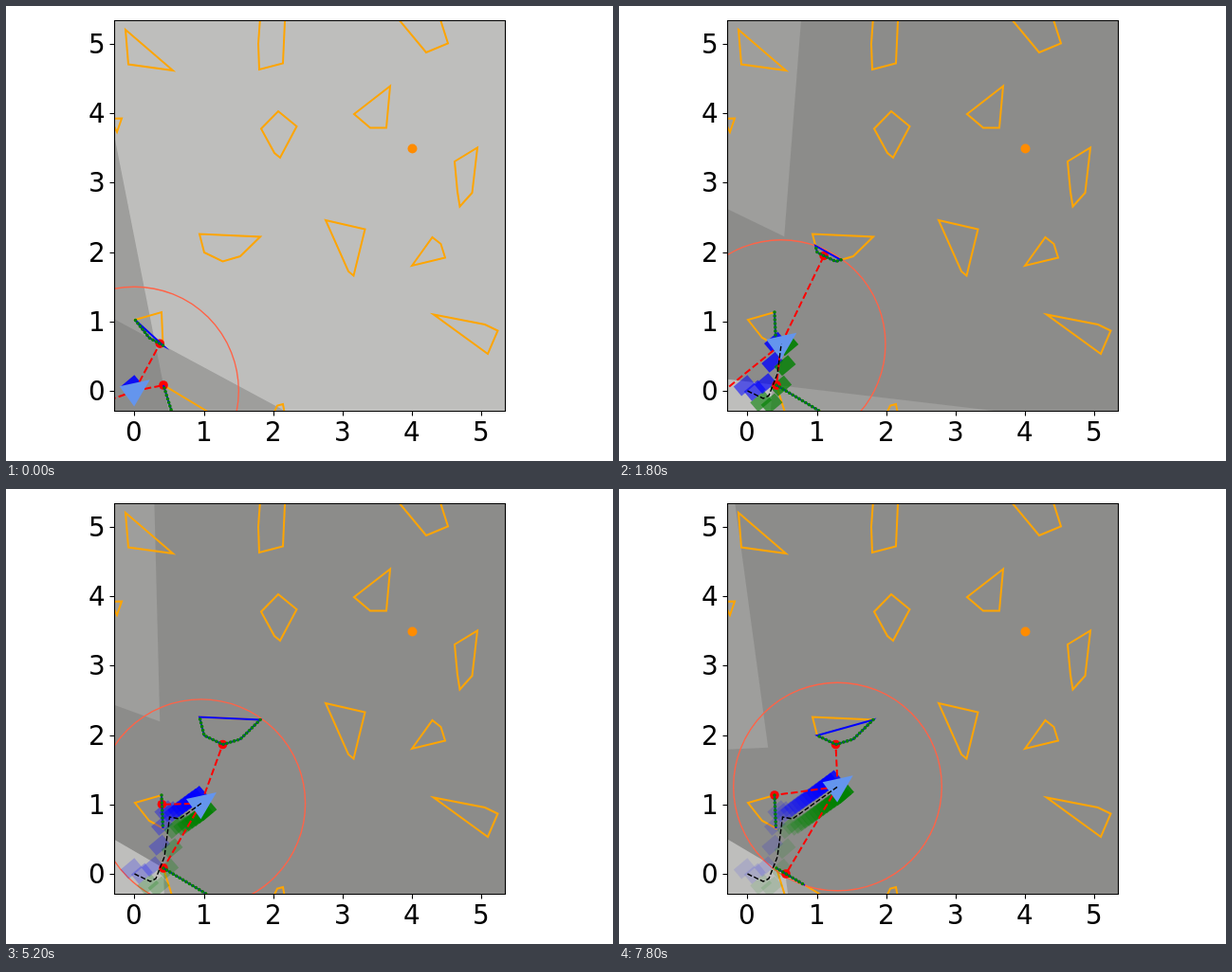
Recreate the animation shown at these times as an HTML page with a canvas. Size 640x480 px, loop 8000 ms.

```html
<!DOCTYPE html>
<html lang="en">
<head>
<meta charset="utf-8">
<title>Walking robot among obstacles</title>
<style>
html, body { margin: 0; width: 100%; height: 100%; overflow: hidden; background: #fff; }
canvas { display: block; }
</style>
</head>
<body>
<canvas id="stage" width="640" height="480"></canvas>
<script>
const ctx = document.getElementById('stage').getContext('2d');
const STEP = 200, STEPS = 40, UNIT = 73.2, RANGE = 1.5 * UNIT;
const ORIGIN = { x: 135.3, y: 406 };
const BOX = { x: 114.5, y: 15.5, size: 412 };
const SHADES = ['#bebebc', '#9e9e9c', '#8c8c8a'];

// Obstacles the robot can sense; the closing edge never faces it.
const upper = [[268,243.5], [247,264], [228.5,269.5], [209,260], [204,240.5]];
const near = [[164,323], [165.5,358], [151,350], [136,331]];
const low = [[180,445], [166,400], [211,427]];
const left = [[70,410], [90,423], [80,440]];

const obstacles = [
  upper, near, low, left,
  [[126,25], [176,68], [129,61.5]],
  [[268.5,5], [266,40], [267,67], [292,60.5], [294.5,5]],
  [[409,8], [443,49], [466,39.5], [456,8]],
  [[287,111], [306.5,127], [289,160], [283,155], [269,129.5]],
  [[405,84.5], [367,114], [384,128.5], [401,128.5]],
  [[473,164], [497,149.5], [491.5,197], [478.5,211.5], [476,196]],
  [[337,226], [378.5,235.5], [366.5,284.5], [361,280]],
  [[428,274], [449.5,244], [458.5,251], [463,265.5]],
  [[451,325.5], [505,336], [518.5,342.5], [508,367]],
  [[283,428], [286,421.5], [292,420], [293.5,428]],
  [[110,119], [122,118.5], [117,133]]
];

// Turning points of the walk: step, x, y.
const route = [
  [0, 135.5, 406], [3, 152, 414], [4, 158, 411], [6, 167, 388],
  [10, 172.5, 346], [14, 183, 348], [39, 230.5, 314]
];

const mix = (a, b, k) => a.map((v, i) => v + (b[i] - v) * k);
const distance = (a, b) => Math.hypot(a[0] - b[0], a[1] - b[1]);
const cross = (a, b, p) => (b[0] - a[0]) * (p[1] - a[1]) - (b[1] - a[1]) * (p[0] - a[0]);

function robotAt(step) {
  const i = Math.max(1, route.findIndex(key => key[0] >= step));
  const a = route[i - 1], b = route[i];
  return mix(a, b, (step - a[0]) / (b[0] - a[0])).slice(1);
}

// Points along the edges that face the robot, and the closest of them.
function scan(shape, robot) {
  const inside = mix(mix(shape[0], shape[1], 0.5), shape[2], 1 / 3);
  const points = [];
  for (let i = 1; i < shape.length; i++) {
    const a = shape[i - 1], b = shape[i];
    if (cross(a, b, robot) * cross(a, b, inside) >= 0) continue;
    const count = Math.ceil(distance(a, b) / 2);
    for (let k = 0; k <= count; k++) points.push(mix(a, b, k / count));
  }
  const dot = points.reduce((best, p) => distance(p, robot) < distance(best, robot) ? p : best);
  return { dot, seen: points.filter(p => distance(p, robot) < RANGE) };
}

function trace(points, close) {
  ctx.beginPath();
  for (const p of points) ctx.lineTo(...p);
  if (close) ctx.closePath();
}

function stroke(color, width, dash = []) {
  ctx.strokeStyle = color;
  ctx.lineWidth = width;
  ctx.setLineDash(dash);
  ctx.stroke();
}

function circle(center, radius) {
  ctx.beginPath();
  ctx.arc(...center, radius, 0, 7);
}

function disc(center, radius, color) {
  circle(center, radius);
  ctx.fillStyle = color;
  ctx.fill();
}

// Fills where the half planes overlap. Each edge runs through its dot at a
// right angle to the line of sight; side 1 lies beyond it, -1 on the robot's side.
function fillPlanes(robot, dots, side, color) {
  ctx.save();
  for (const [x, y] of dots) {
    const angle = Math.atan2(y - robot[1], x - robot[0]);
    const c = Math.cos(angle) * 1000, s = Math.sin(angle) * 1000;
    trace([[x - s, y + c], [x + s, y - c],
      [x + s + side * c, y - c + side * s], [x - s + side * c, y + c + side * s]], true);
    ctx.clip();
  }
  ctx.fillStyle = color;
  ctx.fillRect(BOX.x, BOX.y, BOX.size, BOX.size);
  ctx.restore();
}

function drawShading(robot, nearDot, lowDot, upperDot, upperSeen) {
  const [light, medium, dark] = SHADES;
  const side = upperSeen ? 1 : -1;
  ctx.fillStyle = upperSeen ? dark : light;
  ctx.fillRect(BOX.x, BOX.y, BOX.size, BOX.size);
  fillPlanes(robot, upperSeen ? [nearDot, upperDot] : [nearDot], side, medium);
  fillPlanes(robot, [lowDot], side, medium);
  fillPlanes(robot, [nearDot, lowDot], side, upperSeen ? light : dark);
}

function drawScan(seen) {
  trace(seen, true);
  stroke('#00f', 2);
  ctx.lineCap = 'round';
  trace(seen);
  stroke('#008000', 3.6, [0, 4]);
  ctx.lineCap = 'butt';
}

function drawFootprints(step) {
  for (let k = 0; k <= step; k++) {
    const [x, y] = robotAt(Math.min(k + 0.5, STEPS - 1));
    const side = k % 2 ? 1 : -1;
    ctx.save();
    ctx.translate(x + 6 * side, y + 7 * side);
    ctx.rotate(-40 * Math.PI / 180);
    ctx.globalAlpha = 0.9 * 0.945 ** (step - k);
    ctx.fillStyle = side > 0 ? '#008000' : '#00f';
    ctx.fillRect(-9.5, -6.5, 19, 13);
    ctx.restore();
  }
}

function drawRobot(robot) {
  ctx.save();
  ctx.translate(...robot);
  ctx.rotate(-36 * Math.PI / 180);
  trace([[20, 0], [-10, -13.2], [-10, 13.2]], true);
  ctx.fillStyle = '#6495ed';
  ctx.fill();
  ctx.restore();
}

function drawAxes() {
  const bottom = BOX.y + BOX.size;
  ctx.beginPath();
  ctx.rect(BOX.x, BOX.y, BOX.size, BOX.size);
  stroke('#000', 1.1);
  ctx.fillStyle = '#000';
  ctx.font = '27.78px "DejaVu Sans", sans-serif';
  for (let n = 0; n <= 5; n++) {
    const x = Math.round(ORIGIN.x + n * UNIT), y = Math.round(ORIGIN.y - n * UNIT);
    trace([[x + 0.5, bottom], [x + 0.5, bottom + 5]]);
    stroke('#000', 1.1);
    trace([[BOX.x - 5, y + 0.5], [BOX.x, y + 0.5]]);
    stroke('#000', 1.1);
    ctx.fillText(n, x - 9, 459);
    ctx.fillText(n, 87, y + 10);
  }
}

function draw(step) {
  const robot = robotAt(step);
  const scans = [near, low, upper, left].map(shape => scan(shape, robot));
  const [nearScan, lowScan, upperScan] = scans;

  ctx.fillStyle = '#fff';
  ctx.fillRect(0, 0, 640, 480);
  ctx.save();
  ctx.beginPath();
  ctx.rect(BOX.x, BOX.y, BOX.size, BOX.size);
  ctx.clip();

  drawShading(robot, nearScan.dot, lowScan.dot, upperScan.dot, upperScan.seen.length > 0);
  for (const shape of obstacles) {
    trace(shape, true);
    stroke('#ffa500', 2);
  }
  disc([428.5, 150.5], 5, '#ff8c00');
  circle(robot, RANGE);
  stroke('#ff6347', 1.4);

  drawFootprints(step);
  for (const { dot, seen } of scans) {
    if (!seen.length) continue;
    trace([robot, dot]);
    stroke('#f00', 2, [7.4, 3.2]);
    disc(dot, 4.8, '#f00');
    drawScan(seen);
  }
  drawRobot(robot);

  trace(Array.from({ length: step + 1 }, (_, k) => robotAt(k)));
  stroke('#000', 1.4, [5.2, 2.2]);
  ctx.restore();
  drawAxes();
}

function tick() {
  draw(Math.floor(performance.now() / STEP) % STEPS);
  requestAnimationFrame(tick);
}
tick();
</script>
</body>
</html>
```
